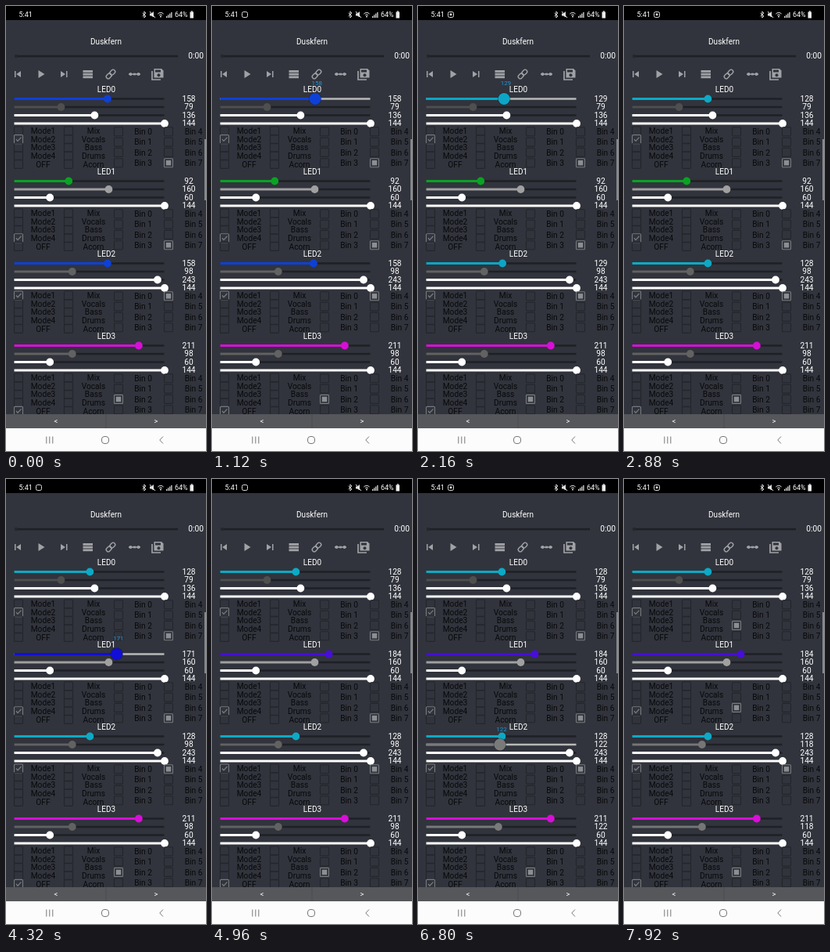
Write an HTML page with a canvas that moves like this. It is 256x568 px and loops after 8 s.

```html
<!DOCTYPE html>
<html lang="en">
<head>
<meta charset="utf-8">
<title>LED mixer</title>
<style>
html, body { margin: 0; width: 100%; height: 100%; overflow: hidden; background: #31343c; }
canvas { display: block; width: 256px; height: 568px; }
</style>
</head>
<body>
<canvas id="stage"></canvas>
<script>
const W = 256, H = 568, LOOP = 8000;
const canvas = document.getElementById('stage');
const c = canvas.getContext('2d');
const scale = window.devicePixelRatio || 1;
canvas.width = W * scale;
canvas.height = H * scale;

const BG = '#31343c', ICON = '#a0a2a6', DARK = '#1e2025', BOX = '#24262c', MARK = '#777a7e';
const MODES = ['Mode1', 'Mode2', 'Mode3', 'Mode4', 'OFF'];
const STEMS = ['Mix', 'Vocals', 'Bass', 'Drums', 'Acorn'];

// [time, value] keys of each drag
const hueA = [[1120, 158], [1520, 91], [1760, 82], [2160, 129], [2480, 134], [2840, 128]];
const hueB = [[4000, 92], [4320, 171], [4560, 181], [4840, 184]];
const sat = [[5520, 98], [6160, 171], [6320, 171], [6900, 118]];
const hueMap = [[0, 0], [91, 128], [128, 189], [158, 225], [171, 241], [184, 257], [211, 300], [255, 360]];

const between = (t, a, b) => t >= a && t < b;

function track(keys, x, ease) {
  if (x <= keys[0][0]) return keys[0][1];
  for (let i = 1; i < keys.length; i++) {
    const [x0, y0] = keys[i - 1], [x1, y1] = keys[i];
    if (x <= x1) {
      let p = (x - x0) / (x1 - x0);
      if (ease) p = p * p * (3 - 2 * p);
      return y0 + (y1 - y0) * p;
    }
  }
  return keys[keys.length - 1][1];
}

const drag = (keys, t) => Math.round(track(keys, t, true));
const hueColor = v => `hsl(${track(hueMap, v)}, 88%, ${v < 120 ? 34 : v < 140 ? 41 : 45}%)`;
const gray = v => `rgb(${v},${v},${v})`;

function rect(x, y, w, h, color) {
  c.fillStyle = color;
  c.fillRect(x, y, w, h);
}

function text(str, x, y, color, size = 10.2, align = 'center') {
  c.font = `${size}px Roboto, "Noto Sans", sans-serif`;
  c.textAlign = align;
  c.fillStyle = color;
  c.fillText(str, x, y + size * 0.36);
}

function disc(x, y, r, color) {
  c.fillStyle = color;
  c.beginPath();
  c.arc(x, y, r, 0, 7);
  c.fill();
}

function path(points, color, width, fill) {
  c.beginPath();
  points.forEach(([x, y], i) => i ? c.lineTo(x, y) : c.moveTo(x, y));
  if (fill) {
    c.fillStyle = color;
    c.fill();
  } else {
    c.strokeStyle = color;
    c.lineWidth = width;
    c.stroke();
  }
}

function outline(x, y, w, h, r, color, width = 1) {
  c.strokeStyle = color;
  c.lineWidth = width;
  c.beginPath();
  c.roundRect(x, y, w, h, r);
  c.stroke();
}

function slider(y, value, max, color, active) {
  const x = 11 + 192 * value / max + (active ? 2 : 0);
  rect(10.5, y - 1.25, 192, 2.5, active ? '#b8b8b8' : DARK);
  rect(10.5, y - 1.5, x - 10.5, 3, color);
  if (active) disc(x, y, 8.3, 'rgba(20,22,26,.4)');
  disc(x, y, active ? 7.5 : 4.9, color);
  text(value, 234, y - 0.3, '#fff');
}

function hint(y, value) {
  text(value, 11 + 192 * value / 255 - 2.5, y - 20, '#2196d8', 8, 'left');
}

function box(x, y, kind) {
  outline(x - 5.5, y - 5.5, 11, 11, 1, kind ? MARK : BOX, 1.1);
  if (kind === 'tick') path([[x - 3, y], [x - 1, y + 2.3], [x + 3.5, y - 2.5]], MARK, 1.3);
  if (kind === 'fill') rect(x - 3.2, y - 3.2, 6.4, 6.4, '#8b8e92');
}

function block(i, led) {
  const top = 105 * i;
  text('LED' + i, 128.5, 106.5 + top, '#fff', 10);
  const rows = [
    [led.hue, 255, hueColor(led.hue)],
    [led.sat, 255, gray(led.sat)],
    [led.level, 255, '#fff'],
    [144, 144, '#fff']
  ];
  // the dragged row goes last so its thumb stays on top
  const order = [0, 1, 2, 3].sort((a, b) => (a === led.active) - (b === led.active));
  for (const n of order) slider(118.5 + 10.5 * n + top, ...rows[n], n === led.active);

  for (let n = 0; n < 5; n++) {
    const y = 159.5 + 10.6 * n + top;
    box(16, y, n === led.mode && 'tick');
    box(80, y);
    text(MODES[n], 47.5, y, '#08090b');
    text(STEMS[n], 112, y, '#08090b');
  }
  for (let n = 0; n < 8; n++) {
    const right = n > 3, y = 160.3 + 13.3 * (n % 4) + top;
    box(right ? 208 : 144, y, n === led.bin && 'fill');
    text('Bin ' + n, right ? 240 : 175.5, y, '#08090b');
  }
  if (led.active === 0) hint(118.5 + top, led.hue);
  if (led.active === 1) hint(129 + top, led.sat);
}

function ripple(x, y, t) {
  const p = (t - 7280) / 480;
  if (p > 0 && p < 1) disc(x, y, 4 + 7 * p, `rgba(150,153,158,${0.25 * (1 - p)})`);
}

function statusBar(t) {
  rect(0, 0, W, 18, '#000');
  text('5:41', 16.5, 11, '#fff', 9, 'left');
  if (t >= 160) {
    outline(38.5, 7.5, 7, 7, 2, '#ddd');
    if (Math.floor(t / 400) % 2) disc(42, 10.8, 1.5, '#ddd');
  }
  path([[174.5, 9], [179, 13], [176.8, 15], [176.8, 7], [179, 9], [174.5, 13]], '#eee', 0.9);
  path([[184, 9.5], [186, 9.5], [189, 7], [189, 14.5], [186, 12.5], [184, 12.5]], '#ddd', 0, true);
  path([[184, 7], [191, 15]], '#eee', 1);
  c.strokeStyle = '#eee';
  c.lineWidth = 1;
  for (const r of [2.5, 5]) {
    c.beginPath();
    c.arc(198, 13.5, r, -2.4, -0.75);
    c.stroke();
  }
  disc(198, 13.5, 1, '#eee');
  for (let i = 0; i < 4; i++) rect(205 + i * 2.1, 13 - i * 1.7, 1.2, 2 + i * 1.7, '#eee');
  text('64%', 216, 11, '#fff', 9, 'left');
  rect(235.5, 7.5, 4.5, 8, '#eee');
  rect(236.8, 6.3, 2, 1.4, '#eee');
}

function toolbar() {
  const y = 87;
  rect(11, y - 4, 1.5, 8, ICON);
  path([[19, y - 4], [19, y + 4], [13.2, y]], ICON, 0, true);
  path([[41.5, y - 5], [41.5, y + 5], [49.5, y]], ICON, 0, true);
  path([[70, y - 4], [70, y + 4], [76, y]], ICON, 0, true);
  rect(77, y - 4, 1.5, 8, ICON);
  for (let i = 0; i < 3; i++) rect(98.5, y - 5 + i * 3.7, 12.5, 2.8, ICON);

  c.save();
  c.translate(134, y);
  c.rotate(-Math.PI / 4);
  outline(-7, -2.6, 7.5, 5.2, 2.6, ICON, 1.4);
  outline(-0.5, -2.6, 7.5, 5.2, 2.6, ICON, 1.4);
  c.restore();

  rect(157, y - 0.8, 15, 1.6, ICON);
  disc(159.5, y, 2, ICON);
  disc(169.5, y, 2, ICON);
  rect(163, y - 1.3, 3, 2.6, ICON);

  path([[187, y - 4], [187, y + 7], [198, y + 7]], ICON, 1.7);
  path([[189.5, y - 7], [199, y - 7], [201.5, y - 4.5], [201.5, y + 4.5], [189.5, y + 4.5]], ICON, 0, true);
  rect(191, y - 5.5, 7, 3, BG);
  disc(195.5, y + 1.3, 2, BG);
}

function header() {
  text('Duskfern', 128, 45, '#fff', 10);
  rect(12, 62.8, 208, 2.5, DARK);
  disc(13, 64, 2.2, '#25272c');
  text('0:00', 253, 63.5, '#fff', 10.2, 'right');
  toolbar();
}

function footer() {
  rect(0, 521, W, 18, '#55575b');
  rect(127.5, 521, 1, 18, '#4a4c50');
  text('<', 64, 530, '#fff', 9.5);
  text('>', 192, 530, '#fff', 9.5);
  rect(0, 539, W, 29, '#fcfcfc');
  for (let i = 0; i < 3; i++) rect(51.3 + i * 4, 549.5, 1, 9, '#777');
  outline(122.5, 549.5, 9, 9, 3.5, '#777');
  path([[201, 549.5], [196.8, 554], [201, 558.5]], '#777', 1);
}

function draw(t) {
  c.setTransform(scale, 0, 0, scale, 0, 0);
  rect(0, 0, W, H, BG);
  statusBar(t);
  header();

  const a = drag(hueA, t), b = drag(hueB, t), s = drag(sat, t);
  const bin = t < 7400 ? 7 : 2;
  const leds = [
    { hue: a, sat: 79, level: 136, mode: 1, bin, active: between(t, 1120, 2860) ? 0 : -1 },
    { hue: b, sat: 160, level: 60, mode: 3, bin, active: between(t, 4000, 4880) ? 0 : -1 },
    { hue: a, sat: s, level: 243, mode: 0, bin: 4, active: between(t, 5520, 6940) ? 1 : -1 },
    { hue: 211, sat: s, level: 60, mode: 4, bin: 2, active: -1 }
  ];
  c.save();
  c.beginPath();
  c.rect(0, 90, W, 431);
  c.clip();
  leds.forEach((led, i) => block(i, led));
  ripple(144, 187, t);
  c.restore();

  rect(254, 170, 2, 78, '#858990');
  footer();
}

const start = performance.now();
function frame() {
  draw((performance.now() - start) % LOOP);
  requestAnimationFrame(frame);
}
frame();
</script>
</body>
</html>
```
